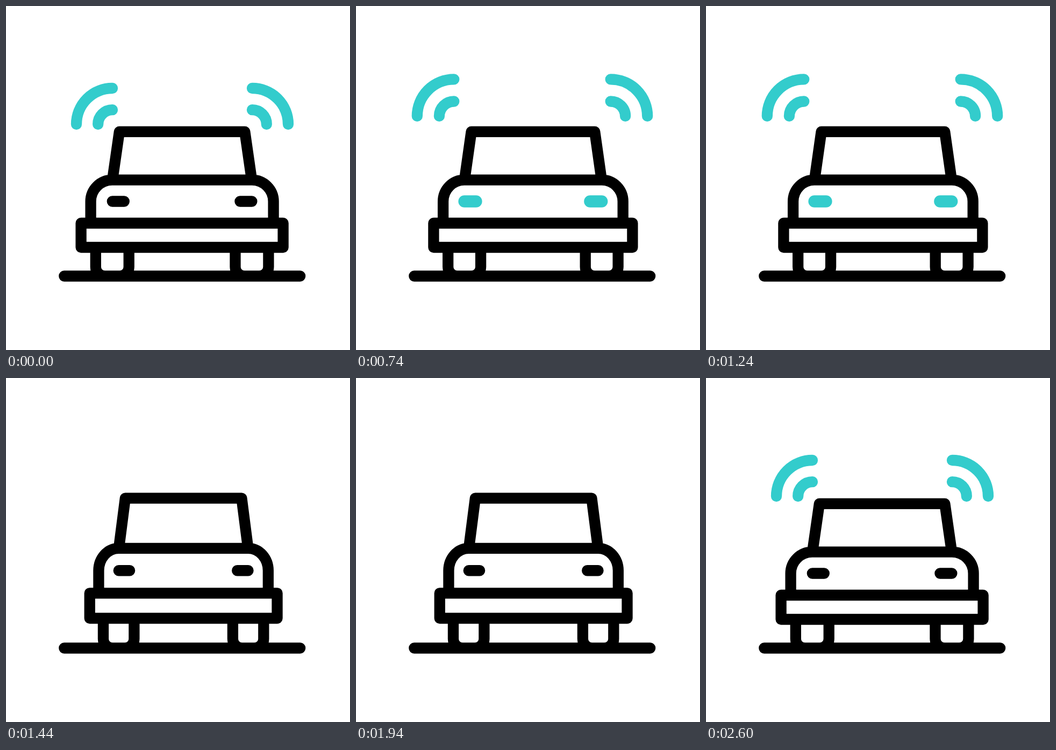
Recreate the animation shown at these times as an HTML page. Size 640 px wide and 640 px high, loop 2700 ms.

```html
<!DOCTYPE html>
<html lang="en">
<head>
<meta charset="utf-8">
<title>Car alarm</title>
<style>
  html, body { margin: 0; width: 100%; height: 100%; overflow: hidden; background: #fff; }
  svg { display: block; width: 100vw; height: 100vh; }
  path { fill: none; stroke: #3cc; stroke-width: 20.3; stroke-linecap: round; stroke-linejoin: round; }
  #car { stroke: #000; }
  #lamps { stroke-width: 22.6; }
</style>
</head>
<body>
<svg viewBox="0 0 640 640">
  <path id="car"/>
  <path id="lamps"/>
  <path id="waves"/>
</svg>
<script>
const LOOP = 2700, STEP = 20, GROUND = 502.5;
const START = 100, FIRST = 240, BEAT = 500, LAST = 2240, END = 2600;

// Car poses: the axis it stands on, stretch across and stretch upwards
const REST = { axis: 327.6, sx: 1, sy: 1 };
const BASE = { axis: 329.4, sx: 0.984, sy: 1 };
const PEAK = { axis: 330.4, sx: 0.908, sy: 1.051 };

// Left wave: centre and outer radius; it grows away from the roof corner
const NEAR = { x: 198, y: 220, r: 67 };
const OPEN = { x: 182.3, y: 204.9, r: 68.5 };
const CORNER = { x: 213, y: 237.5, r: 0 };
const GROWTH = 1.43;

const [car, lamps, waves] = ['car', 'lamps', 'waves'].map(id => document.getElementById(id));

const mix = (a, b, k) =>
  Object.fromEntries(Object.keys(a).map(key => [key, a[key] + (b[key] - a[key]) * k]));
const ease = (from, to, t) => {
  const u = Math.min(1, Math.max(0, (t - from) / (to - from)));
  return u * u * (3 - 2 * u);
};
const hop = c => ease(0, 120, c) - ease(120, 360, c);

function stateAt(t) {
  if (t < FIRST) {
    const k = ease(START, FIRST, t);
    return { pose: mix(REST, BASE, k), wave: mix(NEAR, OPEN, k), glow: 1, lamp: k };
  }
  if (t >= LAST) {
    const c = Math.min(t, END) - LAST;
    const stand = mix(BASE, REST, ease(0, 360, c));
    return { pose: mix(stand, PEAK, hop(c)), wave: NEAR, glow: ease(240, 360, c), lamp: 0 };
  }
  const c = (t - FIRST) % BEAT;
  const pose = mix(BASE, PEAK, hop(c));
  if (c > 380 && t < LAST - BEAT) {
    const glow = ease(380, 460, c);
    return { pose, wave: mix(NEAR, OPEN, ease(380, BEAT, c)), glow, lamp: glow };
  }
  const glow = 1 - ease(60, 160, c);
  const size = 1 + (GROWTH - 1) * ease(0, 160, c);
  return { pose, wave: mix(CORNER, OPEN, size), glow, lamp: glow };
}

function carPaths({ axis, sx, sy }) {
  const X = (side, half) => axis + side * half * sx;
  const Y = height => GROUND - height * sy;
  const sides = part => part(-1) + part(1);
  const box = (half, low, high) =>
    `M${X(-1, half)} ${Y(low)}V${Y(high)}H${X(1, half)}V${Y(low)}Z`;
  const wheel = side => {
    const [l, r] = [X(side, 160.8), X(side, 98.9)].sort((a, b) => a - b);
    const k = 17, top = Y(53.5);
    return `M${l} ${top}V${GROUND - k}a${k} ${k} 0 0 0 ${k} ${k}H${r - k}a${k} ${k} 0 0 0 ${k} ${-k}V${top}`;
  };
  const shoulder = side =>
    `M${axis} ${Y(178.9)}H${X(side, 130)}` +
    `A${40 * sx} ${40 * sy} 0 0 ${side > 0 ? 1 : 0} ${X(side, 170)} ${Y(138.9)}V${Y(98.5)}`;
  const pillar = side =>
    `M${axis} ${Y(268.7)}H${X(side, 116.7)}L${X(side, 129.6)} ${Y(178.9)}`;
  const lamp = side => `M${X(side, 129.8)} ${Y(139)}H${X(side, 107.8)}`;
  const lights = sides(lamp);
  const body = `M108.3 ${GROUND}H547.2` + box(188, 53.5, 98.5) +
    sides(shoulder) + sides(pillar) + sides(wheel) + lights;
  return { body, lights };
}

function wavePath({ x, y, r }) {
  const arc = (cx, side, q) =>
    `M${cx + side * q} ${y}A${q} ${q} 0 0 ${side < 0 ? 1 : 0} ${cx} ${y - q}`;
  return [r, r * 0.4].map(q => arc(x, -1, q) + arc(656 - x, 1, q)).join('');
}

function draw(t) {
  const { pose, wave, glow, lamp } = stateAt(t);
  const { body, lights } = carPaths(pose);
  car.setAttribute('d', body);
  lamps.setAttribute('d', lights);
  lamps.setAttribute('opacity', lamp);
  waves.setAttribute('d', wavePath(wave));
  waves.setAttribute('opacity', glow);
}

const begin = performance.now();
function tick() {
  const t = (performance.now() - begin) % LOOP;
  draw(Math.floor(t / STEP) * STEP);
  requestAnimationFrame(tick);
}
tick();
</script>
</body>
</html>
```
